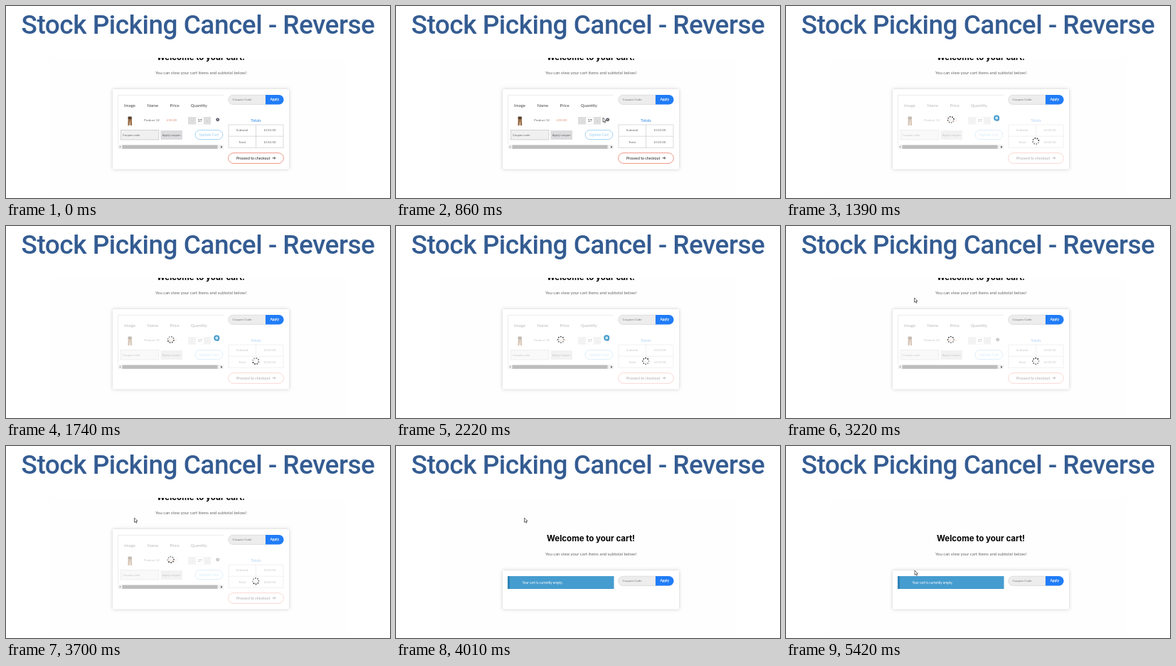
Recreate the animation shown at these times as an HTML page. Size 540 by 270 pixels, loop 6570 ms.

```html
<!DOCTYPE html>
<html lang="en">
<head>
<meta charset="utf-8">
<title>Stock Picking Cancel - Reverse</title>
<style>
  html, body { margin: 0; height: 100%; overflow: hidden; background: #fff; }
  svg { display: block; width: 100vw; height: 100vh; }
  text { font: 4.5px Lato, sans-serif; fill: #666; }
  .mid text, text.mid { text-anchor: middle; }
  .title { font: 500 37px Roboto, sans-serif; letter-spacing: -.5px; fill: #345c92; }
  .welcome { font: 700 11.5px Inter, sans-serif; fill: #000; }
  .head text { font-size: 6px; fill: #444; }
  .panel { fill: #fff; filter: drop-shadow(0 0 2.5px rgba(0, 0, 0, .2)); }
  .lines { fill: none; stroke: #ccc; stroke-width: .7; }
  .veil { fill: #fff; }
</style>
</head>
<body>
<svg viewBox="0 0 540 270">
  <defs>
    <clipPath id="window"><rect x="62" y="73" width="416" height="194"/></clipPath>
    <g id="dots"></g>
  </defs>
  <text class="title mid" x="270" y="39">Stock Picking Cancel - Reverse</text>

  <g clip-path="url(#window)">
    <rect x="62" y="73" width="416" height="194" fill="#fefefe"/>
    <rect id="panel" class="panel" x="150" width="248"/>

    <g id="scroll">
      <text class="welcome mid" x="274" y="76">Welcome to your cart!</text>
      <text class="mid" x="274" y="96" style="font-size:6px">You can view your cart items and subtotal below!</text>
      <path d="M365 125.2H319.2a6.6 6.6 0 0 0 0 13.2H365Z" fill="#ededed" stroke="#d0d0d0" stroke-width=".6"/>
      <path d="M365 125H383.8a6.8 6.8 0 0 1 0 13.6H365Z" fill="#207cf7"/>
      <text x="318.5" y="133.3" style="fill:#777">Coupon Code</text>
      <text class="mid" x="377.7" y="133.4" style="font-weight:700;font-size:4.8px;fill:#fff">Apply</text>
    </g>

    <g id="cart">
      <path class="lines" d="M157.5 194V125.4H306" style="stroke:#e4e4e4"/>
      <g class="head mid">
        <text x="174" y="141.5">Image</text>
        <text x="206.3" y="141.5">Name</text>
        <text x="237.2" y="141.5">Price</text>
        <text x="271.3" y="141.5">Quantity</text>
      </g>
      <path d="M171.8 156H176.6L177.2 168H174.9L174.3 160L173.6 168H171.4Z" fill="#97683f"/>
      <path d="M171.8 155.6H176.6L176.8 159H171.6Z" fill="#54402f"/>
      <text x="194" y="162">Product 12</text>
      <text x="226" y="162" style="fill:#dc8a6c">£30.00</text>
      <path d="M256 156H267V166.5H256ZM278 156H288V166.5H278Z" fill="#dedede"/>
      <path class="lines" d="M267 156.2H278M267 166.3H278" style="stroke:#eee"/>
      <g class="mid">
        <text x="261.5" y="162.8" style="fill:#aaa">-</text>
        <text x="283" y="162.8" style="fill:#aaa">+</text>
        <text x="272.6" y="163.2" style="font-size:5.4px;fill:#333">17</text>
      </g>
      <circle cx="297.7" cy="159.8" r="2.4" fill="#4b4f5c"/>
      <path d="M296.9 159L298.5 160.6M298.5 159L296.9 160.6" stroke="#fff" stroke-width=".7"/>

      <rect x="161.4" y="174.6" width="53.5" height="13.4" fill="#f0f0f0" stroke="#c4c4c4" stroke-width=".7"/>
      <text x="164" y="183" style="font-size:4.2px">Coupon code</text>
      <rect x="217.5" y="175" width="30.5" height="13" fill="#dcdcdf"/>
      <text class="mid" x="232.7" y="183" style="font-size:4.3px">Apply coupon</text>
      <rect x="266" y="174.6" width="38.8" height="13" rx="6.5" fill="#fff" stroke="#8ec8ef" stroke-width=".8"/>
      <text class="mid" x="285.5" y="183" style="font-size:5.1px;fill:#98cdf0">Update Cart</text>

      <rect x="157.5" y="195" width="148.5" height="6.2" fill="#f1f1f1"/>
      <rect x="163.5" y="195.6" width="134" height="5.2" fill="#bdbdbd"/>
      <path d="M161.2 196.8L159.4 198.2L161.2 199.6Z" fill="#999"/>
      <path d="M302.3 196.5L304.3 198.2L302.3 199.9Z" fill="#444"/>

      <g class="mid">
        <text x="351.5" y="162.8" style="font-size:5.7px;fill:#2d86e8">Totals</text>
        <path class="lines" d="M313 167H390V199.3H313ZM313 183.2H390M351.5 167V199.3"/>
        <text x="332" y="176.3">Subtotal</text>
        <text x="371" y="176.3">£510.00</text>
        <text x="332" y="192.6">Total</text>
        <text x="371" y="192.6">£510.00</text>
      </g>
      <rect x="312.6" y="206.6" width="77.8" height="14.8" rx="7.4" fill="#fff" stroke="#ee8e7c" stroke-width=".9"/>
      <text x="324" y="215.6" style="font-size:5.25px;fill:#222">Proceed to checkout</text>
      <path d="M374.6 213.8H378.6M377.2 212.3L378.8 213.8L377.2 215.3" fill="none" stroke="#222" stroke-width=".8"/>

      <g id="block">
        <path id="veil" class="veil" d="M158 126H306V194.5H158ZM312 156H391.5V222.5H312Z"/>
        <use class="spinner" href="#dots" data-at="231.8,159.8"/>
        <use class="spinner" href="#dots" data-at="351.2,190"/>
      </g>
    </g>

    <g id="empty">
      <rect x="157" y="183" width="149.5" height="18" fill="#459ccf"/>
      <rect x="157" y="183" width="3" height="18" fill="#2e82b7"/>
      <text x="177.5" y="193.8" style="font-size:4.67px;fill:#fff">Your cart is currently empty.</text>
    </g>

    <g id="cursor">
      <path id="arrow" d="M0 0V6.3L1.5 5L2.5 7.3L3.5 6.8L2.5 4.6H4.5Z" fill="#fff" stroke="#333" stroke-width=".7" stroke-linejoin="round"/>
      <circle id="busy" r="3.1" fill="#c4e3f3" stroke="#3f98cc" stroke-width="1.8"/>
    </g>
  </g>
</svg>
<script>
const LOOP = 6570, ENTER = 110, CLICK = 1210, EMPTIED = 3930, SCROLL = 58;

// Pointer path: time, x, y
const path = [
  [110, 379, 262], [380, 318, 205], [580, 267, 169], [740, 283, 165],
  [860, 291, 157], [1020, 296, 157.5], [2220, 296.5, 157.5],
  [2530, 211, 104], [2650, 180.5, 101], [5180, 180.5, 101],
  [5340, 180.5, 185], [5420, 181, 175]
];

const $ = id => document.getElementById(id);
const show = (id, on) => $(id).style.display = on ? '' : 'none';
const clamp = v => Math.min(1, Math.max(0, v));
const ease = p => p * p * (3 - 2 * p);

const spinners = [...document.querySelectorAll('.spinner')];
for (let i = 0; i < 8; i++) {
  const a = i * Math.PI / 4;
  $('dots').innerHTML += `<circle cx="${4.2 * Math.cos(a)}" cy="${4.2 * Math.sin(a)}" r=".95"
    fill="#222" opacity="${.45 + .07 * i}"/>`;
}

function pointerAt(t) {
  const next = path.findIndex(key => key[0] > t);
  if (next < 0) return path.at(-1).slice(1);
  if (next === 0) return path[0].slice(1);
  const [t0, x0, y0] = path[next - 1], [t1, x1, y1] = path[next];
  const p = (t - t0) / (t1 - t0);
  return [x0 + (x1 - x0) * p, y0 + (y1 - y0) * p];
}

function draw(t) {
  const emptied = t >= EMPTIED, blocked = t >= CLICK && !emptied;
  show('cart', !emptied);
  show('empty', emptied);
  show('block', blocked);
  $('scroll').setAttribute('transform', `translate(0 ${emptied ? SCROLL : 0})`);
  $('panel').setAttribute('y', emptied ? 175 : 117);
  $('panel').setAttribute('height', emptied ? 54.5 : 112.5);

  $('veil').setAttribute('opacity', .63 * clamp((t - CLICK + 40) / 200));
  const turn = 360 * ease((t - CLICK) / 1000 % 1);
  for (const s of spinners)
    s.setAttribute('transform', `translate(${s.dataset.at}) rotate(${turn})`);

  const [x, y] = pointerAt(t);
  const busy = blocked && y > 126;
  show('cursor', t >= ENTER);
  show('arrow', !busy);
  show('busy', busy);
  $('cursor').setAttribute('transform', `translate(${x} ${y})`);
}

const start = performance.now();
function tick() {
  draw((performance.now() - start) % LOOP);
  requestAnimationFrame(tick);
}
tick();
</script>
</body>
</html>
```
